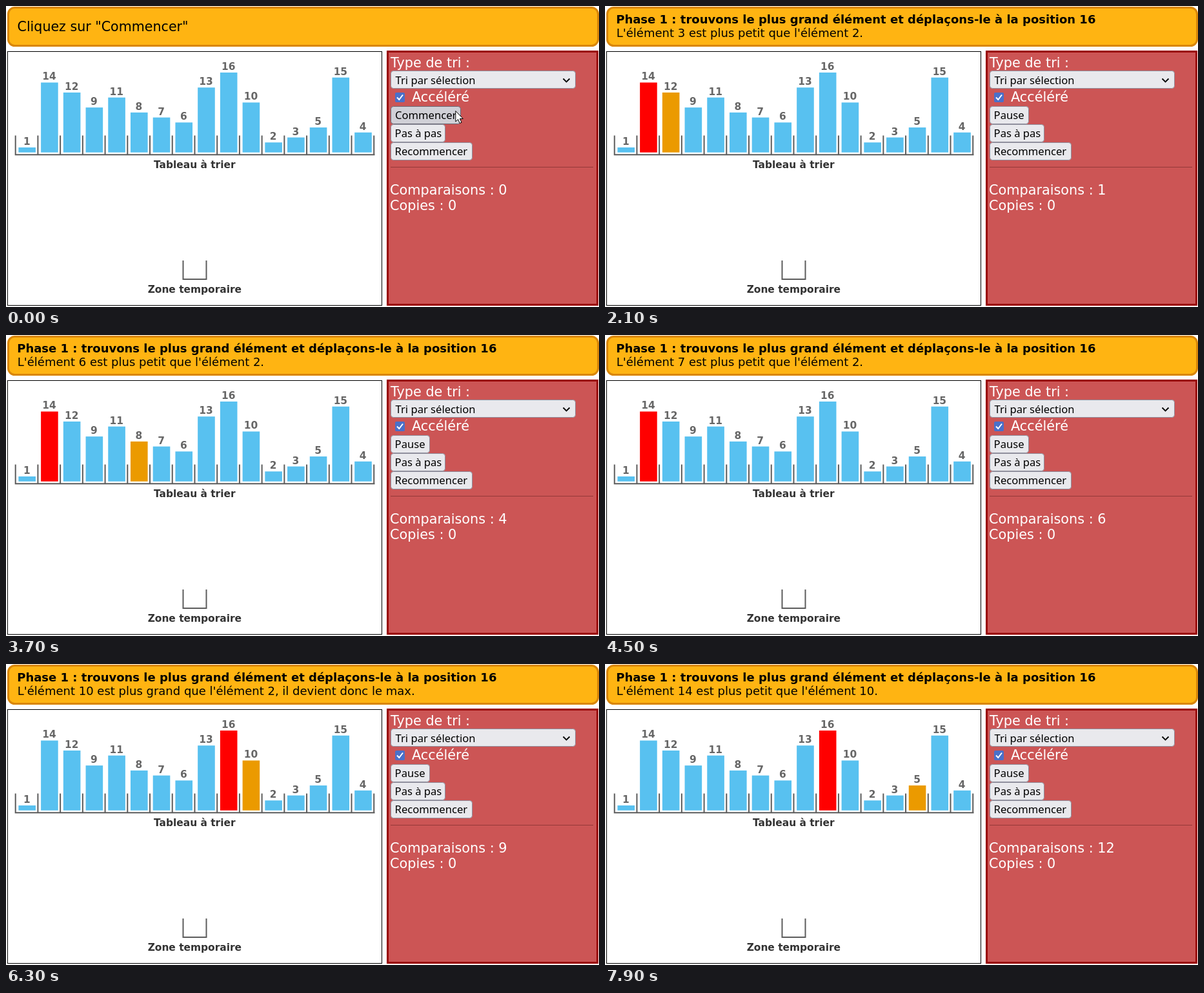
Animation, 919 px wide and 466 px high, one loop 8 s. Source, as an HTML page:

```html
<!DOCTYPE html>
<html lang="fr">
<head>
<meta charset="utf-8">
<title>Tri par sélection</title>
<style>
  html, body { margin: 0; width: 100%; height: 100%; overflow: hidden; background: #fff; }
  svg { display: block; width: 919px; height: 466px; font-family: "DejaVu Sans", sans-serif; white-space: pre; }
  .big { font-size: 20.6px; }
  .msg { font-size: 18px; }
  .bold { font-weight: bold; }
  .panel { font-size: 20.8px; fill: #fff; }
  .ui { font: 16.6px "Noto Sans", "Open Sans", sans-serif; fill: #000; }
  .control { fill: #e9e9ed; stroke: #8f8f9d; }
  .control.hover { fill: #d0d0d7; stroke: #676774; }
  .caption { font: bold 15.42px "DejaVu Sans", sans-serif; fill: #333; text-anchor: middle; }
  .value { fill: #666; }
  .slot { fill: none; stroke: #5c5c5c; stroke-width: 2; }
</style>
</head>
<body>
<svg viewBox="0 0 919 466">
  <rect x="3.5" y="2.5" width="914" height="59" rx="10" fill="#ffb412" stroke="#d98608" stroke-width="3"/>
  <text id="intro" class="big" x="17.5" y="38.5">Cliquez sur "Commencer"</text>
  <text id="phase" class="msg bold" x="17.2" y="27">Phase 1 : trouvons le plus grand élément et déplaçons-le à la position 16</text>
  <text id="detail" class="msg" x="17.8" y="48"></text>

  <rect x="2.5" y="70.5" width="580" height="393" fill="#fff" stroke="#000"/>
  <g id="bars"></g>
  <path id="slots" class="slot"/>
  <text class="caption" x="292.3" y="251">Tableau à trier</text>
  <path class="slot" d="M274.5 394V423H310.5V394"/>
  <text class="caption" x="292.3" y="444">Zone temporaire</text>

  <rect x="591.5" y="70.5" width="325" height="392" fill="#cc5555" stroke="#990000" stroke-width="3"/>
  <text class="panel" x="596" y="95">Type de tri :</text>
  <rect class="control" x="596.5" y="100.5" width="286" height="27" rx="4"/>
  <text class="ui" x="603.6" y="120.5">Tri par sélection</text>
  <path d="M863.5 112.5L868.5 117.5L873.5 112.5" fill="none" stroke="#000" stroke-width="1.8"/>
  <rect x="603" y="134" width="15" height="15" rx="2" fill="#4a70c9"/>
  <path d="M606 141.5L609.3 145L615 137.5" fill="none" stroke="#fff" stroke-width="2"/>
  <text class="panel" x="629" y="148">Accéléré</text>
  <g id="start">
    <rect class="control hover" x="596.5" y="155.5" width="108" height="27" rx="4"/>
    <text class="ui" x="603" y="175">Commencer</text>
  </g>
  <g id="pause">
    <rect class="control" x="596.5" y="155.5" width="60" height="27" rx="4"/>
    <text class="ui" x="602.6" y="175">Pause</text>
  </g>
  <rect class="control" x="596.5" y="183.5" width="84" height="27" rx="4"/>
  <text class="ui" x="602.6" y="203">Pas à pas</text>
  <rect class="control" x="596.5" y="211.5" width="126" height="27" rx="4"/>
  <text class="ui" x="602.6" y="231">Recommencer</text>
  <path d="M596 249.5H910" stroke="#943838"/>
  <text id="count" class="panel" x="595" y="292"></text>
  <text class="panel" x="595" y="316">Copies : 0</text>
  <path id="cursor" d="M0 0V16.5L3.8 13L6.4 19L9.2 17.8L6.6 12H11.5Z" fill="#fff" stroke="#000"/>
</svg>
<script>
const LOOP = 8000, START = 900, FIRST_RED = 1000;
const VALUES = [1, 14, 12, 9, 11, 8, 7, 6, 13, 16, 10, 2, 3, 5, 15, 4];
const BLUE = '#58c1f0', RED = '#ff0000', ORANGE = '#eb9a00';
const PITCH = 34.72, UNIT = 7.73, FLOOR = 226.7;

// Per comparison, from element 2 on: highlight, message, counter, release (ms)
const STEPS = [
  [1400, 1400, 1700, 1600],
  [2000, 2100, 2200, 2400],
  [2700, 2700, 2700, 3000],
  [3100, 3200, 3300, 3500],
  [3600, 3700, 3800, 4000],
  [4100, 4200, 4300, 4500],
  [4600, 4700, 4800, 5000],
  [5200, 5200, 5300, 5600],
  [5700, 5700, 6000, 5900],
  [6300, 6400, 6500, 6700],
  [6800, 6900, 7000, 7200],
  [7300, 7400, 7500, 7700],
  [7800, 7900, 8000, 8200]
];
// Pointer tip after the click, one place per 100 ms
const EXIT = [[722, 160], [800, 155], [895, 150]];

const $ = id => document.getElementById(id);
const show = (id, on) => { $(id).style.display = on ? '' : 'none'; };
const put = (id, text) => { if ($(id).textContent !== text) $(id).textContent = text; };

function add(tag, attrs, text = '') {
  const el = document.createElementNS('http://www.w3.org/2000/svg', tag);
  for (const key in attrs) el.setAttribute(key, attrs[key]);
  el.textContent = text;
  return $('bars').appendChild(el);
}

const bars = VALUES.map((v, i) => {
  const x = 19.4 + i * PITCH, y = FLOOR - v * UNIT;
  add('text', { class: 'caption value', x: x + 12.9, y: y - 4 }, v);
  return add('rect', { x, y, width: 26.6, height: v * UNIT });
});

let slots = 'M13.7 230.2H571.5';
for (let i = 0; i <= VALUES.length; i++) slots += `M${14.7 + i * PITCH} 200.5V230`;
$('slots').setAttribute('d', slots);

function draw(t) {
  const running = t >= START;
  let max = 0, lit = -1, count = 0, message = '';
  STEPS.forEach(([on, say, tally, off], n) => {
    const i = n + 1, bigger = VALUES[i] > VALUES[max];
    if (t >= on && t < off) lit = i;
    if (t >= say) {
      message = `L'élément ${i + 1} est plus ${bigger ? 'grand' : 'petit'} que l'élément ${max + 1}`
        + (bigger ? ', il devient donc le max.' : '.');
    }
    if (t >= tally) count = i;
    if (bigger && t >= off) max = i;
  });

  bars.forEach((bar, i) => {
    const red = i === max && t >= FIRST_RED;
    bar.setAttribute('fill', red ? RED : i === lit ? ORANGE : BLUE);
  });
  show('intro', !running);
  show('phase', running);
  show('start', !running);
  show('pause', running);
  put('detail', message);
  put('count', `Comparaisons : ${count}`);

  const tip = running ? EXIT[Math.floor((t - START) / 100)] : [696.8, 162.5];
  show('cursor', !!tip);
  if (tip) $('cursor').setAttribute('transform', `translate(${tip})`);
}

const began = performance.now();
function tick() {
  draw((performance.now() - began) % LOOP);
  requestAnimationFrame(tick);
}
tick();
</script>
</body>
</html>
```
